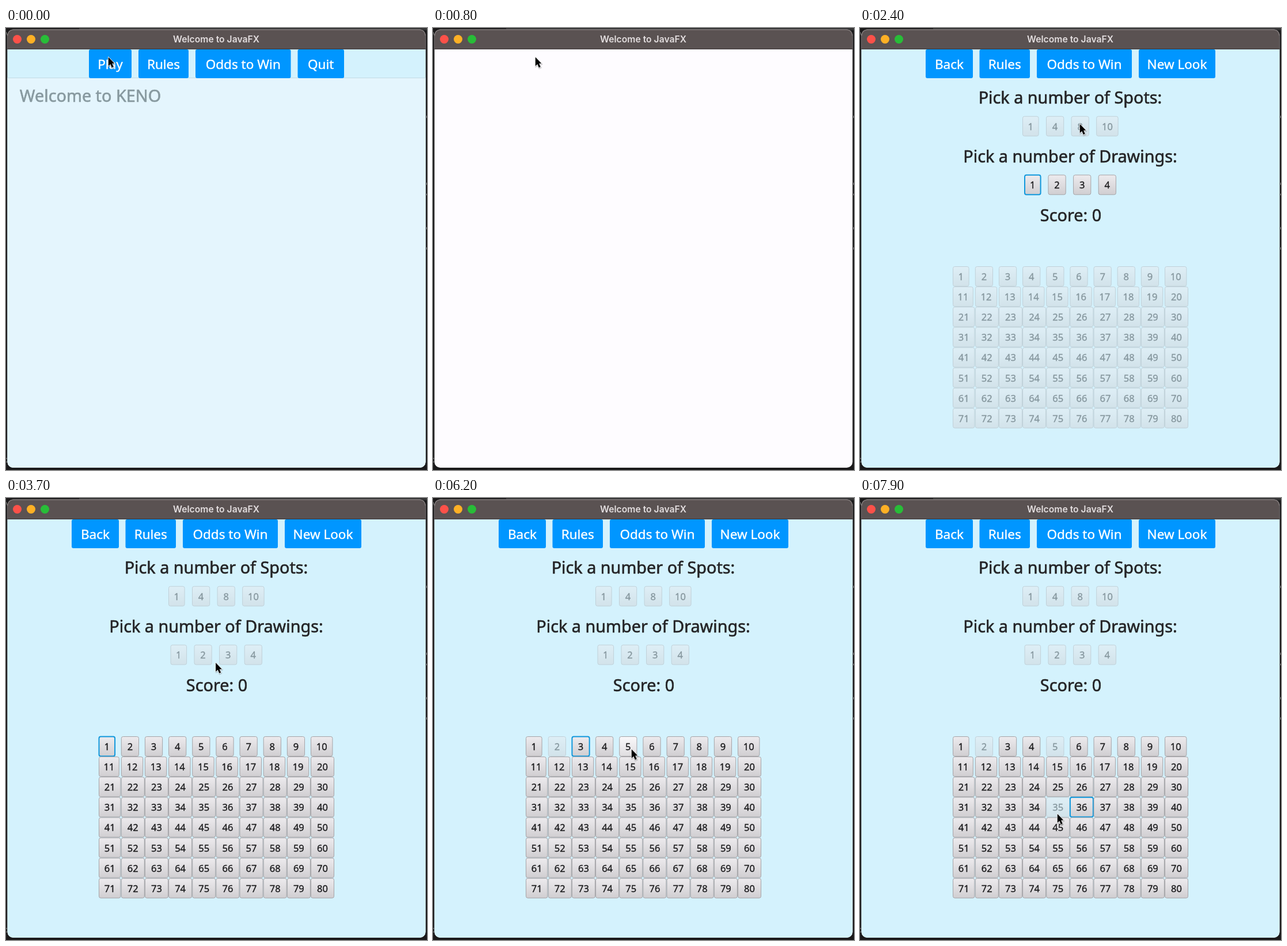
Write an HTML page that moves like this. It is 731x766 px and loops after 8000 ms.

```html
<!DOCTYPE html>
<html lang="en">
<head>
<meta charset="utf-8">
<title>Keno</title>
<style>
  html, body { margin: 0; width: 100%; height: 100%; overflow: hidden; background: #1b1a1b; }
  svg { display: block; width: 731px; height: 766px; }
  text { font-family: "Noto Sans", "Open Sans", sans-serif; text-anchor: middle; fill: #242426; stroke-linejoin: round; }
  .title { font: 600 15.7px Inter, Roboto, sans-serif; fill: #e3dedf; }
  .heading { font-size: 28.8px; stroke: #242426; stroke-width: .6; }
  .heading.dim { fill: #87999f; stroke: #87999f; }
  .nav rect { fill: #0096ff; }
  .nav text { font-size: 22.5px; fill: #fff; stroke: #fff; stroke-width: .4; }
  .key rect { fill: url(#face); stroke: #a5a3a6; }
  .key text { font-size: 16.5px; fill: #1c1c1e; stroke: #1c1c1e; stroke-width: .35; }
  .key.hover rect { fill: url(#lit); }
  .key.focus rect { stroke: #1098dc; stroke-width: 2; }
  .key.off { opacity: .42; }
</style>
</head>
<body>
<svg viewBox="0 0 731 766">
  <defs>
    <linearGradient id="face" x2="0" y2="1">
      <stop stop-color="#edebee"/><stop offset="1" stop-color="#d0ced1"/>
    </linearGradient>
    <linearGradient id="lit" x2="0" y2="1">
      <stop stop-color="#faf9fb"/><stop offset="1" stop-color="#dfdde0"/>
    </linearGradient>
    <clipPath id="frame"><rect x="2.5" y="2.5" width="726" height="759.5" rx="10"/></clipPath>
  </defs>
  <rect width="731" height="766" fill="#1b1a1b"/>
  <rect x="127" width="604" height="4" fill="#343435"/>
  <path d="M0 7l3 7M0 746h2M0 752h2M730.5 152v4M730.5 268v4M730.5 287v3M730.5 345v4M730.5 380v4"
        stroke="#8c8c8c" fill="none"/>
  <g clip-path="url(#frame)">
    <rect width="731" height="766" fill="#fefcff"/>
    <g id="home">
      <rect y="37" width="731" height="729" fill="#d4f2fd"/>
      <rect y="86" width="731" height="680" fill="#e4f5fd"/>
      <path d="M3 86.5H728" stroke="#c3dbe5"/>
      <text class="heading dim" x="146.5" y="128">Welcome to KENO</text>
    </g>
    <g id="game">
      <rect y="37" width="731" height="729" fill="#d4f2fd"/>
      <text class="heading" x="365" y="131">Pick a number of Spots:</text>
      <text class="heading" x="365" y="233">Pick a number of Drawings:</text>
      <text class="heading" x="366" y="335">Score: 0</text>
    </g>
    <rect width="731" height="37" fill="#5a5252"/>
    <path d="M0 36.5H731" stroke="#393434"/>
    <circle cx="19.5" cy="19.5" r="7.5" fill="#fc5149"/>
    <circle cx="43.5" cy="19.5" r="7.5" fill="#fdb025"/>
    <circle cx="67.5" cy="19.5" r="7.5" fill="#28bd38"/>
    <text class="title" x="365" y="24.5">Welcome to JavaFX</text>
  </g>
  <path d="M3 13a10 10 0 0 1 10-10H718a10 10 0 0 1 10 10" fill="none" stroke="#8b8484"/>
  <g id="cursor">
    <path d="M.8 1.5V18L4.6 14.5 7.3 21 10.4 19.7 7.7 13.4H12.2Z" transform="translate(.6 1.2)"
          fill="#000" stroke="#000" stroke-width="3" stroke-linejoin="round" opacity=".16"/>
    <path d="M.8 1.5V18L4.6 14.5 7.3 21 10.4 19.7 7.7 13.4H12.2Z"
          fill="#000" stroke="#fff" stroke-width="1.6" stroke-linejoin="round" paint-order="stroke"/>
  </g>
</svg>
<script>
const LOOP = 8000, STEP = 100;
const GAME_AT = 1000, SPOTS_AT = 2200, DRAWINGS_AT = 3300;
const picks = { 2: 4900, 5: 6500, 35: 7600 };
const focusChanges = [
  [0, ''], [SPOTS_AT, 'drawings1'], [DRAWINGS_AT, 'grid1'],
  [picks[2], 'grid3'], [picks[5], 'grid6'], [picks[35], 'grid36']
];
// Pointer moves: start time, end time, destination
const moves = [
  [1200, 2000, 381, 165], [2600, 3100, 381, 267], [3500, 4500, 212, 431],
  [5200, 6100, 344, 434], [6700, 7400, 342, 546]
];

const home = document.getElementById('home');
const game = document.getElementById('game');
const cursor = document.getElementById('cursor');

function add(parent, tag, attrs, text = '') {
  const node = document.createElementNS('http://www.w3.org/2000/svg', tag);
  for (const name in attrs) node.setAttribute(name, attrs[name]);
  node.textContent = text;
  return parent.appendChild(node);
}

function addNav(parent, items) {
  const bar = add(parent, 'g', { class: 'nav' });
  for (const [label, x, width] of items) {
    add(bar, 'rect', { x, y: 37, width, height: 50, rx: 3 });
    add(bar, 'text', { x: x + width / 2, y: 70.7 }, label);
  }
}

const keys = [];
const keyWidth = n => [...String(n)].reduce((w, d) => w + (d === '1' ? 7.2 : 9.8), 21.4);

function addKey(group, n, x, y) {
  const w = keyWidth(n), h = 35;
  const node = add(game, 'g', { class: 'key' });
  add(node, 'rect', { x: x + .5, y: y + .5, width: w - 1, height: h - 1, rx: 3 });
  add(node, 'text', { x: x + w / 2, y: y + 24 }, n);
  keys.push({ group, n, x, y, w, h, node });
}

function addKeyRow(group, numbers, x, y) {
  for (const n of numbers) {
    addKey(group, n, x, y);
    x += keyWidth(n) + 12.4;
  }
}

addNav(home, [['Play', 144, 74], ['Rules', 230, 87], ['Odds to Win', 329, 165.5], ['Quit', 506.5, 80.5]]);
addNav(game, [['Back', 114, 82], ['Rules', 207.5, 87.5], ['Odds to Win', 307, 165], ['New Look', 484, 133]]);
addKeyRow('spots', [1, 4, 8, 10], 282, 152.7);
addKeyRow('drawings', [1, 2, 3, 4], 285.5, 254.3);
for (let i = 0; i < 80; i++) {
  const col = i % 10, row = Math.floor(i / 10);
  addKey('grid', i + 1, col ? 199.8 + 41.15 * (col - 1) : 161, 413 + 35.1 * row);
}

function easeBoth(p) {
  if (p < .2) return 3.125 * p * p;
  if (p > .8) return 1 - 3.125 * (1 - p) ** 2;
  return 1.25 * p - .125;
}

function pointerAt(t) {
  let x = 177, y = 49;
  for (const [start, end, toX, toY] of moves) {
    if (t < start) break;
    const p = Math.min(1, (t - start) / (end - start));
    const k = p * p * (3 - 2 * p);
    x += (toX - x) * k;
    y += (toY - y) * k;
  }
  return [x, y];
}

function isOff({ group, n }, t) {
  if (group === 'spots') return t >= SPOTS_AT;
  if (group === 'drawings') return t >= DRAWINGS_AT;
  return t < DRAWINGS_AT || t >= picks[n];
}

function render(t) {
  const [px, py] = pointerAt(t);
  const focus = focusChanges.filter(([at]) => t >= at).pop()[1];
  home.setAttribute('opacity', 1 - easeBoth(Math.min(1, t / 800)));
  game.setAttribute('visibility', t < GAME_AT ? 'hidden' : 'visible');
  cursor.setAttribute('transform', `translate(${px} ${py}) scale(.94)`);
  for (const key of keys) {
    const over = px >= key.x && px < key.x + key.w && py >= key.y && py < key.y + key.h;
    const off = isOff(key, t);
    key.node.setAttribute('class', 'key' + (off ? ' off' : over ? ' hover' : '') +
      (focus === key.group + key.n ? ' focus' : ''));
  }
}

const began = performance.now();
function tick() {
  const t = (performance.now() - began) % LOOP;
  render(Math.floor(t / STEP) * STEP);
  requestAnimationFrame(tick);
}
tick();
</script>
</body>
</html>
```
